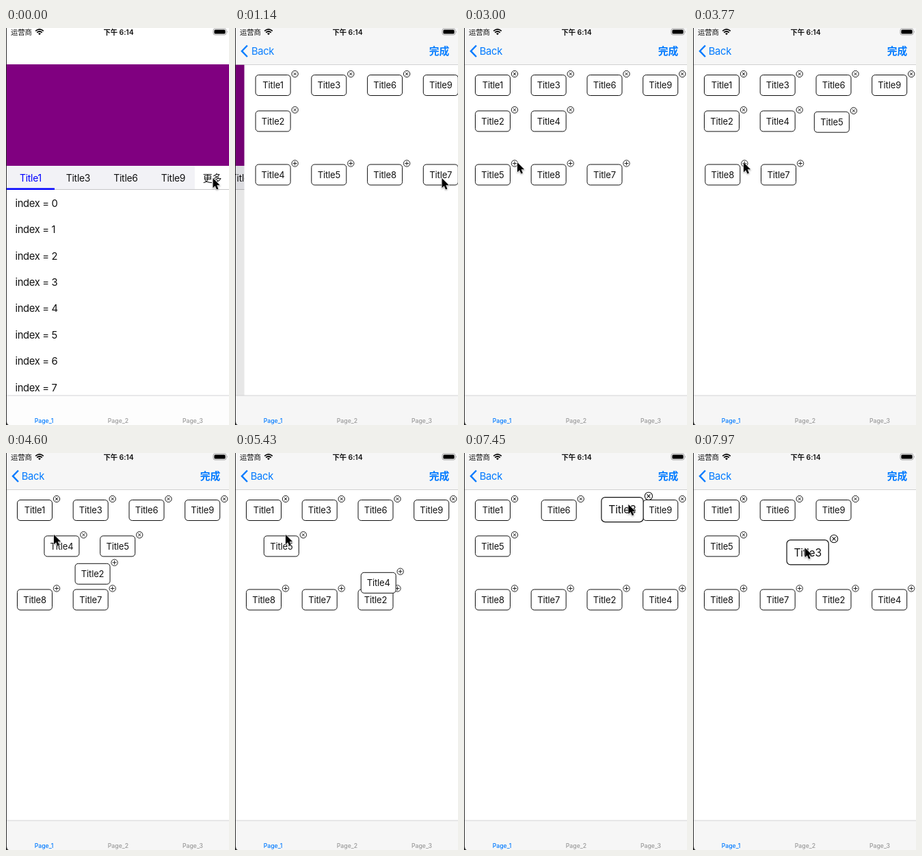
These frames come from a looping animation (326 px wide and 579 px high, 8 s). An HTML page:

```html
<!DOCTYPE html>
<html lang="zh-CN">
<head>
<meta charset="utf-8">
<title>Tab editor</title>
<style>
html, body { margin: 0; width: 100%; height: 100%; overflow: hidden; background: #fff; }
svg { display: block; width: 326px; height: 579px; }
:root {
  /* chip slots: row a, b, c and column 1 to 4 */
  --a1: 42px 83.5px; --a2: 123.7px 83.5px; --a3: 205.5px 83.5px; --a4: 287.2px 83.5px;
  --b1: 42px 135.9px; --b2: 123.7px 135.9px; --b3: 205.5px 135.9px;
  --c1: 42px 214px; --c2: 123.7px 214px; --c3: 205.5px 214px; --c4: 287.2px 214px;
}
text { font-family: Inter, "Noto Sans CJK SC", sans-serif; fill: #111; }
.mid { text-anchor: middle; }
.body { font-size: 14.8px; letter-spacing: -.36px; }
.tab { font-size: 13.9px; letter-spacing: -.25px; }
.chip text { font-size: 13px; letter-spacing: -.15px; }
.small { font-size: 8.7px; font-weight: 500; }
.status { font-size: 10.4px; letter-spacing: -.1px; }
.blue { fill: #007aff; }

.old, .new, .dim, .bar, .back, .chip, .cursor {
  animation-duration: 8s; animation-iteration-count: infinite; animation-timing-function: linear;
}
.old, .new, .dim, .bar, .back { animation-timing-function: cubic-bezier(.2, .68, .15, 1); }
.old { animation-name: shift; }
.new { animation-name: push; }
.dim { animation-name: dim; }
.bar { animation-name: show; }
.back { animation-name: back; }
@keyframes shift {
  0%, 9.9375% { translate: 0 0; }
  17.4375%, to { translate: -98px 0; }
}
@keyframes push {
  0%, 9.9375% { translate: 326px 0; }
  17.4375%, to { translate: 0 0; }
}
@keyframes dim {
  0%, 9.9375% { opacity: 0; }
  17.4375%, to { opacity: .1; }
}
@keyframes show {
  0%, 9.9375% { opacity: 0; }
  17.4375%, to { opacity: 1; }
}
@keyframes back {
  0%, 9.9375% { translate: 26px 0; }
  17.4375%, to { translate: 0 0; }
}

.chip { animation-timing-function: ease-in-out; }
.badge { transform: translate(32px, -16.5px); }
.badge use { rotate: 45deg; animation: 8s step-end infinite; }
.add .badge use { rotate: 0deg; }
#t1 { translate: var(--a1); }
#t2 { animation-name: t2; }
#t3 { animation-name: t3, grow; animation-timing-function: linear; }
#t4 { animation-name: t4; }
#t5 { animation-name: t5; }
#t6 { animation-name: t6; }
#t7 { animation-name: t7; }
#t8 { animation-name: t8; }
#t9 { animation-name: t9; }
#t2 .badge use { animation-name: icon2; }
#t4 .badge use { animation-name: icon4; }
#t5 .badge use { animation-name: icon5; }
@keyframes t2 {
  0%, 55.6% { translate: var(--b1); }
  59.35%, to { translate: var(--c3); }
}
@keyframes t4 {
  0%, 33.1% { translate: var(--c1); }
  36.85%, 55.6% { translate: var(--b2); }
  59.35%, 65.6% { translate: var(--b1); }
  69.35%, to { translate: var(--c4); }
}
@keyframes t5 {
  0%, 33.1% { translate: var(--c2); }
  36.85%, 43.73% { translate: var(--c1); }
  47.48%, 55.6% { translate: var(--b3); }
  59.35%, 65.6% { translate: var(--b2); }
  69.35%, to { translate: var(--b1); }
}
@keyframes t8 {
  0%, 33.1% { translate: var(--c3); }
  36.85%, 43.73% { translate: var(--c2); }
  47.48%, to { translate: var(--c1); }
}
@keyframes t7 {
  0%, 33.1% { translate: var(--c4); }
  36.85%, 43.73% { translate: var(--c3); }
  47.48%, to { translate: var(--c2); }
}
@keyframes t6 {
  0%, 90.5% { translate: var(--a3); }
  94.25%, to { translate: var(--a2); }
}
@keyframes t9 {
  0%, 93.5% { translate: var(--a4); }
  97.25%, to { translate: var(--a3); }
}
/* dragged chip */
@keyframes t3 {
  0%, 82.9% { translate: var(--a2); }
  82.95%, 88.25% { translate: 124px 84.3px; animation-timing-function: ease-in; }
  89.75% { translate: 143px 81.5px; }
  91.625% { translate: 196px 81px; }
  93.5% { translate: 240px 83px; }
  95% { translate: 262px 90px; }
  96.125% { translate: 255px 104px; }
  97.375% { translate: 231px 120px; }
  98.5% { translate: 199px 132px; }
  99.625% { translate: 168px 144.8px; }
  to { translate: 158px 149px; }
}
@keyframes grow {
  0%, 82.9% { scale: 1; }
  82.95%, to { scale: 1.2; }
}
@keyframes icon2 { 0% { rotate: 45deg; } 55.6%, to { rotate: 0deg; } }
@keyframes icon4 { 0% { rotate: 0deg; } 33.1% { rotate: 45deg; } 65.6%, to { rotate: 0deg; } }
@keyframes icon5 { 0% { rotate: 0deg; } 43.73%, to { rotate: 45deg; } }

.cursor { animation-name: cursor; filter: drop-shadow(0 1px 1px rgba(0, 0, 0, .35)); }
@keyframes cursor {
  0%, 14.25% { translate: 302.5px 219px; animation-timing-function: ease-in; }
  19.9% { translate: 267px 190px; }
  24.625% { translate: 81px 126px; animation-timing-function: ease-out; }
  26.1% { translate: 66px 106px; animation-timing-function: ease-in-out; }
  29.4%, 30.4% { translate: 73px 195px; }
  31.25%, 35% { translate: 74px 196px; }
  37.5%, 39.5% { translate: 78px 196px; }
  41.9%, 47.6% { translate: 74px 196px; animation-timing-function: ease-in-out; }
  51.9% { translate: 72px 108px; animation-timing-function: ease-in-out; }
  53.6%, 59.5% { translate: 70px 119px; }
  63.25%, 69.5% { translate: 74px 119px; animation-timing-function: ease-in-out; }
  75.1%, 88% { translate: 127px 76px; animation-timing-function: ease-in; }
  89.5% { translate: 146px 73.5px; }
  91.375% { translate: 199px 73px; }
  93.25% { translate: 243px 75px; }
  94.75% { translate: 265px 82px; }
  95.875% { translate: 258px 96px; }
  97.125% { translate: 234px 112px; }
  98.25% { translate: 202px 124px; }
  99.625% { translate: 164px 138px; }
  to { translate: 154px 142px; }
}
</style>
</head>
<body>
<svg viewBox="0 0 326 579">
  <defs>
    <rect id="box" x="-25.5" y="-15" width="51" height="30" rx="4.5" fill="#fff" stroke="#111"/>
    <g id="plus" fill="#fff" stroke="#111" stroke-width=".9">
      <circle r="4.7"/>
      <path d="M-2.9 0H2.9M0 -2.9V2.9"/>
    </g>
  </defs>
  <rect width="326" height="579" fill="#fff"/>

  <g class="old">
    <rect y="53" width="326" height="148" fill="#800080"/>
    <rect y="201" width="276" height="35" fill="#f2f2f6"/>
    <path d="M0 235.5H326" stroke="#c6c6c8"/>
    <rect y="233.5" width="71" height="2.5" fill="#00f"/>
    <g id="tabs" class="mid"></g>
    <g id="list"></g>
    <rect class="dim" y="53" width="430" height="526"/>
  </g>

  <g class="new">
    <rect y="53" width="326" height="526" fill="#fff"/>
    <g id="chips" class="mid"></g>
  </g>

  <rect width="326" height="53" fill="#fff"/>
  <g class="bar">
    <rect width="326" height="53" fill="#f6f6f6"/>
    <path d="M0 53.5H326" stroke="#c4c4c6" stroke-width=".8"/>
    <path d="M18 25.5L10 33.7L18 42" fill="none" stroke="#007aff" stroke-width="2.4"/>
    <text class="body blue back" x="22.8" y="39.2">Back</text>
    <text class="blue mid" x="298.5" y="39.3" font-size="14.8" font-weight="600">完成</text>
  </g>

  <rect y="536" width="326" height="43" fill="#fdfdfd"/>
  <rect class="bar" y="536" width="326" height="43" fill="#f6f6f6"/>
  <path d="M0 536H326" stroke="#cfcfd1" stroke-width=".9"/>
  <g class="mid">
    <text class="small blue" x="55.5" y="575.8">Page_1</text>
    <text class="small" x="164" y="575.8" style="fill:#999">Page_2</text>
    <text class="small" x="273" y="575.8" style="fill:#999">Page_3</text>
  </g>

  <text class="status" x="7" y="9.9" font-weight="500">运营商</text>
  <g fill="none" stroke="#000" stroke-width="1.7">
    <path d="M43.2 4.4Q49 -.6 54.8 4.4M45.2 6.6Q49 3.4 52.8 6.6"/>
    <path d="M47 8L49 10.2L51 8Q49 6.6 47 8Z" fill="#000" stroke="none"/>
  </g>
  <text class="status mid" x="164.5" y="9.9" font-weight="600">下午 6:14</text>
  <rect x="303" y="1" width="19" height="9" rx="2.6" fill="none" stroke="#999" stroke-width=".9"/>
  <rect x="304.4" y="2.4" width="16.2" height="6.2" rx="1.5"/>
  <path d="M323.3 4Q325 5.5 323.3 7Z" fill="#999"/>

  <path d="M0 0H1V573Q1 578 4 579H0Z" fill="#2c2c2c"/>

  <g class="cursor">
    <path d="M0 0V14.2L3.2 11.2L5.5 16.4L7.9 15.4L5.7 10.3H10.2Z" stroke="#fff" stroke-width="1.1" paint-order="stroke"/>
  </g>
</svg>
<script>
const fill = (id, items, draw) => {
  document.getElementById(id).innerHTML = items.map(draw).join("");
};

fill("tabs", ["Title1", "Title3", "Title6", "Title9", "更多"], (name, i) =>
  `<text class="tab" x="${[36, 105.5, 175, 244.5, 301.5][i]}" y="223.6"${i ? "" : ' style="fill:#00f"'}>${name}</text>`);

fill("list", [...Array(8).keys()], i =>
  `<text class="body" x="13.5" y="${260.8 + 38.4 * i}">index = ${i}</text>`);

fill("chips", [1, 6, 9, 2, 4, 5, 8, 7, 3], n =>
  `<g id="t${n}" class="chip${[4, 5, 7, 8].includes(n) ? " add" : ""}">
    <use href="#box"/><text y="4.8">Title${n}</text>
    <g class="badge"><use href="#plus"/></g>
  </g>`);
</script>
</body>
</html>
```
